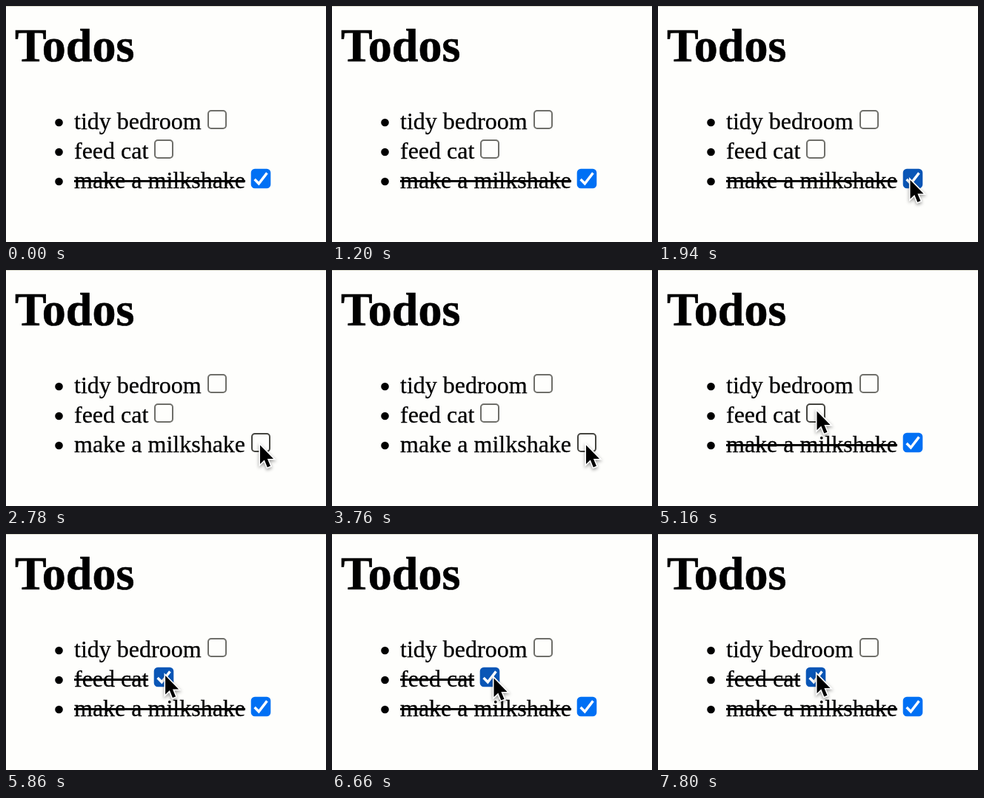
These frames come from a looping animation (432x320 px, 8000 ms). An HTML page:

```html
<!DOCTYPE html>
<html lang="en">
<meta charset="utf-8">
<title>Todos</title>
<style>
  html, body { margin: 0; width: 100%; height: 100%; overflow: hidden; background: #fefefc; }
  svg { display: block; width: 432px; height: 320px; }
  text { font: 32px "Liberation Serif", "Times New Roman", Times, serif; stroke: #000; stroke-width: .3; }
  .title { font-size: 64px; font-weight: bold; stroke-width: .6; }
  .box { fill: #fefefc; stroke: #6f6f6a; stroke-width: 2; }
  .hover .box { stroke: #454540; }
  .done .box { fill: #0070f4; stroke: #0070f4; stroke-width: 2.6; }
  .done.hover .box { fill: #0a56b6; stroke: #0a56b6; }
  .tick { fill: none; stroke: #fff; stroke-width: 3.4; }
  .tick, .strike { visibility: hidden; }
  .done .tick, .done .strike { visibility: visible; }
  #cursor { filter: drop-shadow(0 2px 2px #0006); }
</style>
<svg viewBox="0 0 432 320">
  <rect width="432" height="1" fill="#dcdcce"/>
  <text class="title" x="12" y="75">Todos</text>
  <g id="list"></g>
  <path id="cursor" d="M0 0V25.5L5.8 20L9.8 30L14 28.3L9.9 18.5H18Z"
    stroke="#fff" stroke-width="3.2" paint-order="stroke"/>
</svg>
<script>
const LOOP = 8000;
const list = document.getElementById('list');
const cursor = document.getElementById('cursor');

const todos = [
  { text: 'tidy bedroom', boxX: 272, done: t => false },
  { text: 'feed cat', boxX: 200, done: t => t >= 5700 },
  { text: 'make a milkshake', boxX: 331, done: t => t < 2400 || t >= 4040 }
];

todos.forEach((todo, i) => {
  const y = 167 + 40 * i;
  todo.boxY = y - 26;
  list.insertAdjacentHTML('beforeend', `<g>
    <circle cx="71.5" cy="${y - 9}" r="5.3"/>
    <text x="92" y="${y}">${todo.text}</text>
    <rect class="strike" x="92" y="${y - 11}" width="${todo.boxX - 100}" height="3"/>
    <g transform="translate(${todo.boxX} ${todo.boxY})">
      <rect class="box" x="1" y="1" width="24" height="24" rx="4"/>
      <path class="tick" d="M4.6 14L10.3 19.8L21.4 5.4"/>
    </g></g>`);
  todo.node = list.lastElementChild;
});

// Pointer stops: time, x, y
const stops = [
  [1200, 356, 324], [1940, 340.5, 236], [2040, 340.5, 236], [2180, 343, 239],
  [2360, 343, 239], [2700, 343, 237.5], [4080, 343, 237.5], [4740, 214.5, 191.5],
  [5680, 214.5, 191.5], [6420, 218.5, 195.5], [6680, 218.5, 195.5], [7240, 214.5, 190.5],
  [LOOP, 214.5, 190.5]
];

function pointer(t) {
  const i = stops.findIndex(s => s[0] > t);
  if (i < 1) return null;
  const [t0, x0, y0] = stops[i - 1], [t1, x1, y1] = stops[i];
  const p = (t - t0) / (t1 - t0), k = p * p * (3 - 2 * p);
  return { x: x0 + (x1 - x0) * k, y: y0 + (y1 - y0) * k };
}

function draw(t) {
  const tip = pointer(t);
  cursor.style.display = tip ? '' : 'none';
  if (tip) cursor.setAttribute('transform', `translate(${tip.x} ${tip.y})`);
  for (const { node, boxX, boxY, done } of todos) {
    const over = tip && Math.abs(tip.x - boxX - 13) < 13 && Math.abs(tip.y - boxY - 13) < 13;
    node.classList.toggle('done', done(t));
    node.classList.toggle('hover', !!over);
  }
}

function tick() {
  draw(performance.now() % LOOP);
  requestAnimationFrame(tick);
}
tick();
</script>
</html>
```
